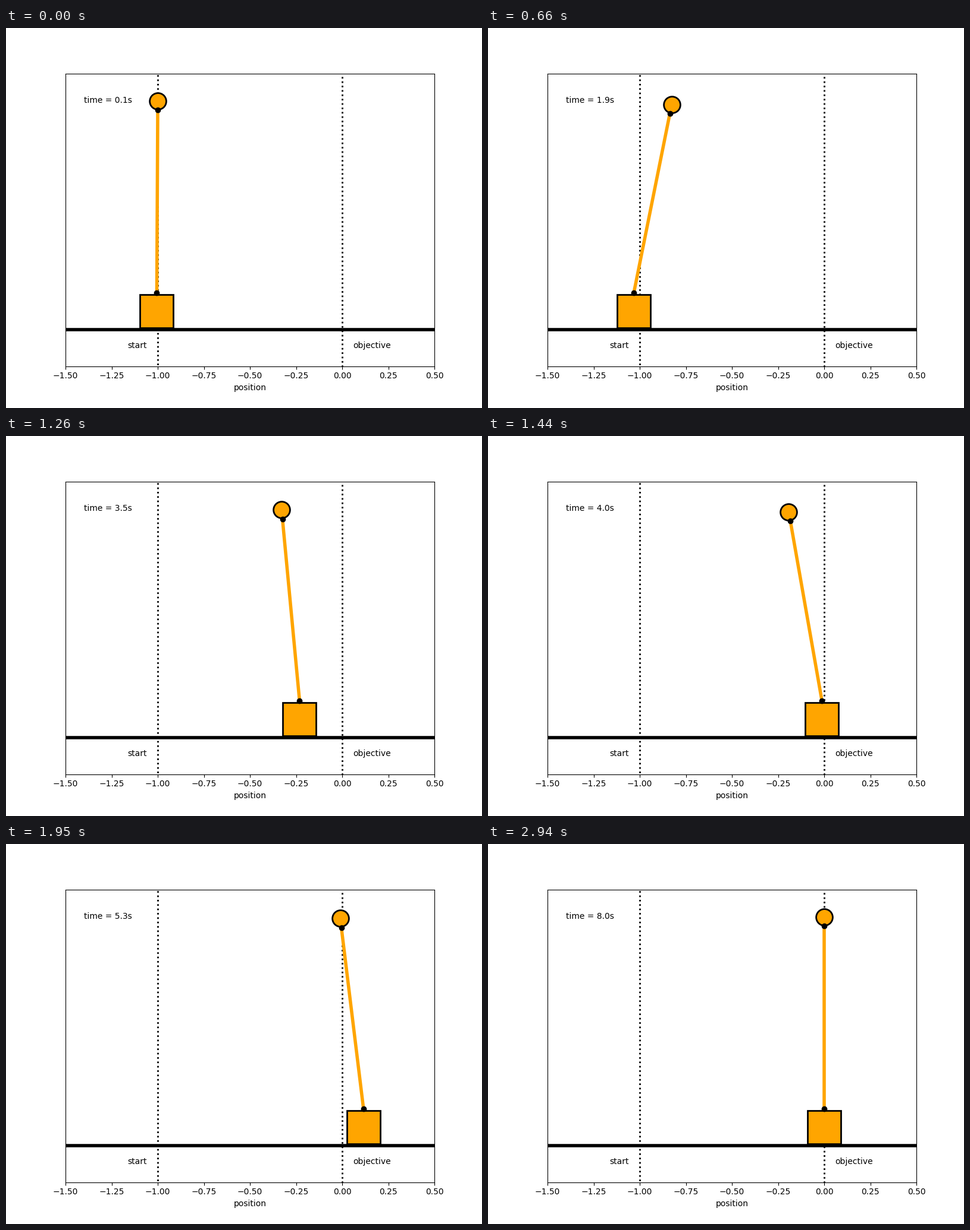
Write a matplotlib script that moves like this. It is 800 px wide and 640 px high and loops after 2970 ms.

```python
import numpy as np
import matplotlib.pyplot as plt
from matplotlib.animation import FuncAnimation

N = 100          # time points over the horizon
END = 76         # step at which the cart must be at rest
T = np.linspace(0, 8, N)
DT = T[1]
EPS = 1 / 11     # pole mass / total mass


def solve():
    """Least-effort move of the cart from -1 to 0 (implicit Euler steps)."""
    # state: position, speed, angle, angular speed
    A = np.array([[0, 1, 0, 0],
                  [0, 0, -EPS, 0],
                  [0, 0, 0, 1],
                  [0, 0, 1, 0]], float)
    B = np.array([0, 1, 0, -1], float)
    M = np.linalg.inv(np.eye(4) - DT * A)
    x0 = np.array([-1.0, 0, 0, 0])

    power = np.linalg.matrix_power
    G = np.column_stack([power(M, END - k) @ (DT * B) for k in range(END)])
    u = np.linalg.lstsq(G, -power(M, END) @ x0, rcond=None)[0]

    X = np.zeros((N, 4))
    X[0] = x0
    for k in range(1, END):
        X[k] = M @ (X[k - 1] + DT * B * u[k - 1])
    return X[:, 0], X[:, 2]


pos, theta = solve()

fig = plt.figure(figsize=(8, 6.4), dpi=100)
ax = fig.add_subplot(111, autoscale_on=False, xlim=(-1.5, 0.5), ylim=(-0.4, 1.2))
ax.set_xlabel('position')
ax.get_yaxis().set_visible(False)

ax.plot([-1.5, 0.5], [-0.2, -0.2], 'k-', lw=4)
ax.plot([-1, -1], [-1.5, 1.5], 'k:', lw=2)
ax.plot([0, 0], [-0.5, 1.5], 'k:', lw=2)
ax.text(-1.06, -0.3, 'start', ha='right')
ax.text(0.06, -0.3, 'objective', ha='left')


def mass(marker, size):
    return ax.plot([], [], ls='None', marker=marker, ms=size, color='orange',
                   markeredgecolor='k', markeredgewidth=2)[0]


cart = mass('s', 40)
bob = mass('o', 20)
pole, = ax.plot([], [], 'o-', color='orange', lw=4, ms=6,
                markeredgecolor='k', markerfacecolor='k')
clock = ax.text(0.05, 0.9, '', transform=ax.transAxes)


def animate(i):
    x, s, c = pos[i], np.sin(theta[i]), np.cos(theta[i])
    cart.set_data([x], [-0.1])
    bob.set_data([x + 1.05 * s], [1.05 * c])
    pole.set_data([x, x + s], [0, c])
    clock.set_text(f'time = {T[i]:.1f}s')
    return cart, bob, pole, clock


ani = FuncAnimation(fig, animate, frames=range(1, N), interval=30,
                    repeat=True, repeat_delay=0, blit=False)
plt.show()
```
